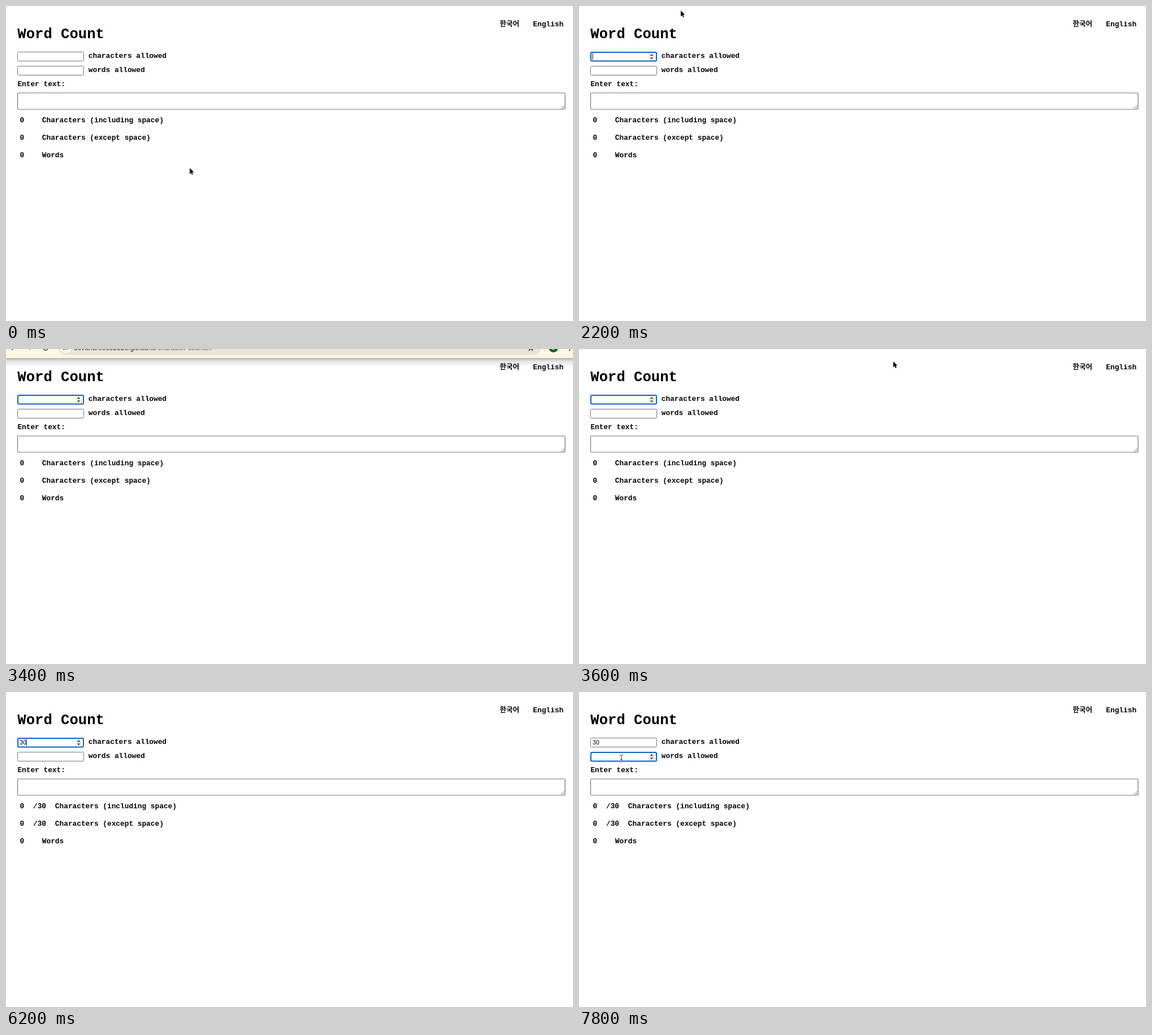
These frames come from a looping animation (1003 by 558 pixels, 8000 ms). An HTML page with a canvas:

```html
<!DOCTYPE html>
<html lang="en">
<head>
<meta charset="utf-8">
<title>Word Count</title>
<style>
  html, body { margin: 0; width: 100%; height: 100%; overflow: hidden; background: #fefefe; }
  canvas { display: block; }
</style>
</head>
<body>
<canvas id="stage" width="1003" height="558"></canvas>
<script>
const ctx = document.getElementById('stage').getContext('2d');
const LOOP = 8000, STEP = 200;
const MONO = 'bold 12.8px "Liberation Mono", monospace';
const SANS = '10.67px "Liberation Sans", sans-serif';
const FIELD_Y = [81, 106];

// Pointer keys: [time, x, y, shape]; each pose holds until the next key.
const pointer = [
  [0, 325, 287, 'arrow'], [200, 336, 290, 'arrow'], [400, 345, 293, 'arrow'],
  [1400, 135.5, 79, 'arrow'], [1600, 101, 89, 'beam'], [1800, 99, 89, 'beam'],
  [2000, 118, 60, 'arrow'], [2200, 180, 8, 'arrow'], [2400, 0, 0, 'none'],
  [3600, 556, 22, 'arrow'], [3800, 555, 78, 'arrow'], [4000, 552, 134, 'arrow'],
  [4200, 548.5, 172, 'beam'], [4400, 547.5, 183.5, 'beam'], [6000, 0, 0, 'none'],
  [6400, 400, 166, 'beam'], [6600, 170, 104, 'arrow'], [6800, 80, 84.5, 'beam'],
  [7000, 75, 112, 'beam'], [7200, 75, 117.5, 'beam']
];
// Bottom edge of the browser bar over time.
const bar = [[0, -30], [2400, 11], [2600, 48], [2800, 75], [3000, 83], [3400, 16], [3600, -30]];

const at = (keys, t) => keys.filter(k => k[0] <= t).pop();

function text(str, x, y, font = MONO, color = '#000') {
  ctx.font = font;
  ctx.fillStyle = color;
  ctx.fillText(str, x, y);
}

function line(points, color = '#000', width = 1) {
  ctx.beginPath();
  points.forEach(([x, y], i) => i ? ctx.lineTo(x, y) : ctx.moveTo(x, y));
  ctx.strokeStyle = color;
  ctx.lineWidth = width;
  ctx.stroke();
}

function shape(points, color) {
  ctx.beginPath();
  points.forEach(([x, y]) => ctx.lineTo(x, y));
  ctx.closePath();
  ctx.fillStyle = color;
  ctx.fill();
}

function disc(x, y, r, color) {
  ctx.beginPath();
  ctx.arc(x, y, r, 0, 7);
  ctx.fillStyle = color;
  ctx.fill();
}

function box(x, y, w, h, radius, color, width) {
  ctx.beginPath();
  ctx.roundRect(x, y, w, h, radius);
  ctx.fillStyle = '#fff';
  ctx.fill();
  ctx.strokeStyle = color;
  ctx.lineWidth = width;
  ctx.stroke();
}

function field(y, value, focused, caret) {
  if (focused) {
    box(21, y + 1, 116, 15.5, 2, '#145dbe', 2);
    ctx.fillStyle = '#ededed';
    ctx.fillRect(123, y + 3, 11, 12);
    shape([[125.7, y + 7.2], [128.5, y + 4], [131.3, y + 7.2]], '#444');
    shape([[125.7, y + 10.3], [128.5, y + 13.5], [131.3, y + 10.3]], '#444');
  } else {
    box(20.5, y + 0.5, 117, 16, 2, '#767676', 1);
  }
  text(value, 24, y + 12.3, SANS);
  if (caret) {
    ctx.fillStyle = '#000';
    ctx.fillRect(23.7 + value.length * 5.93, y + 2.5, 1, 12);
  }
}

function counter(label, y, limit) {
  text('0', 24.6, y);
  if (limit) text('/' + limit, 48, y);
  text(label, 63.8 + (limit ? (limit.length + 1) * 7.68 : 0), y);
}

function page(t) {
  ctx.fillStyle = '#fefefe';
  ctx.fillRect(0, 0, 1003, 558);
  text('한국어', 873.6, 36, 'bold 12.4px "Noto Sans CJK KR", "Noto Sans CJK", "Noto Sans CJK JP", sans-serif');
  text('English', 932.3, 36);
  text('Word Count', 20.3, 57, 'bold 25.6px "Liberation Mono", monospace');

  const limit = '30'.slice(0, t < 6000 ? 0 : t < 6200 ? 1 : 2);
  const focus = t < 1800 ? -1 : t < 7200 ? 0 : 1;
  const blinkStart = t < 6000 ? 1750 : t < 7200 ? 6100 : 7200;
  const caretOn = t >= 6000 && t < 6200 || (t - blinkStart) % 1000 < 500;
  FIELD_Y.forEach((y, i) => field(y, i ? '' : limit, focus === i, focus === i && caretOn));
  text('characters allowed', 145.8, 92);
  text('words allowed', 145.8, 117);
  text('Enter text:', 20.4, 142);

  box(20.5, 154, 968.5, 29, 1.5, '#767676', 1.2);
  line([[981.5, 182], [988, 175.5]], '#666', 0.9);
  line([[985, 182], [988, 179]], '#666', 0.9);

  counter('Characters (including space)', 206, limit);
  counter('Characters (except space)', 237, limit);
  counter('Words', 267.5, '');
}

function browserBar(bottom) {
  if (bottom < 0) return;
  ctx.save();
  ctx.translate(0, bottom);
  const shadow = ctx.createLinearGradient(0, 0, 0, 15);
  shadow.addColorStop(0, 'rgba(0,0,0,.3)');
  shadow.addColorStop(0.35, 'rgba(0,0,0,.11)');
  shadow.addColorStop(1, 'rgba(0,0,0,0)');
  ctx.fillStyle = shadow;
  ctx.fillRect(0, 0, 1003, 15);
  ctx.fillStyle = '#fef6e1';
  ctx.fillRect(0, -100, 1003, 100);

  ctx.beginPath();
  ctx.roundRect(92, -33, 855, 27.5, 13.7);
  ctx.fillStyle = '#e9e4d8';
  ctx.fill();
  disc(105.5, -19.5, 10.5, '#fef6e1');

  const ink = '#4a463c';
  line([[12, -24], [7.5, -19], [12, -14]], ink, 1.4);
  line([[8, -19], [17, -19]], ink, 1.4);
  line([[41, -24], [45.5, -19], [41, -14]], '#aaa494', 1.4);
  line([[36, -19], [45, -19]], '#aaa494', 1.4);
  ctx.beginPath();
  ctx.arc(70, -18.5, 4.6, -0.4, 5.2);
  ctx.strokeStyle = ink;
  ctx.stroke();
  line([[101, -22], [106, -22]], ink, 1.3);
  line([[105, -16], [110, -16]], ink, 1.3);
  disc(108.5, -22, 1.6, ink);
  disc(102.5, -16, 1.6, ink);

  const host = 'dovanureeso2020.github.io';
  const urlFont = '12px "Liberation Sans", sans-serif';
  text(host, 120, -14.5, urlFont, '#2b2823');
  text('/character-counter/', 120 + ctx.measureText(host).width, -14.5, urlFont, '#67635a');

  const star = Array.from({ length: 11 }, (_, i) => {
    const a = i * Math.PI / 5 - Math.PI / 2, r = i % 2 ? 2.5 : 5.5;
    return [928.5 + r * Math.cos(a), -18 + r * Math.sin(a)];
  });
  line(star, ink, 1.2);
  disc(968.5, -18.5, 8.5, '#1e5f22');
  text('D', 965, -15, SANS, '#fff');
  [-23, -18.5, -14].forEach(y => disc(997, y, 1.3, ink));
  ctx.restore();
}

function drawPointer([, x, y, kind]) {
  ctx.save();
  ctx.translate(x, y);
  if (kind === 'arrow') {
    const outline = [[0, 0], [0, 10.4], [2.3, 8.3], [4, 12], [5.7, 11.2], [4.1, 7.7], [7.3, 7.4], [0, 0]];
    line(outline, '#fff', 1.6);
    shape(outline, '#000');
  } else if (kind === 'beam') {
    const strokes = [
      [[-3, -6], [-1, -6], [0, -5], [1, -6], [3, -6]],
      [[-3, 6], [-1, 6], [0, 5], [1, 6], [3, 6]],
      [[0, -5], [0, 5]], [[-1.8, 2.5], [1.8, 2.5]]
    ];
    strokes.forEach(s => line(s, '#fff', 2));
    strokes.forEach(s => line(s, '#222', 1));
  }
  ctx.restore();
}

function draw() {
  const t = Math.floor(performance.now() % LOOP / STEP) * STEP;
  page(t);
  browserBar(at(bar, t)[1]);
  drawPointer(at(pointer, t));
  requestAnimationFrame(draw);
}
draw();
</script>
</body>
</html>
```
